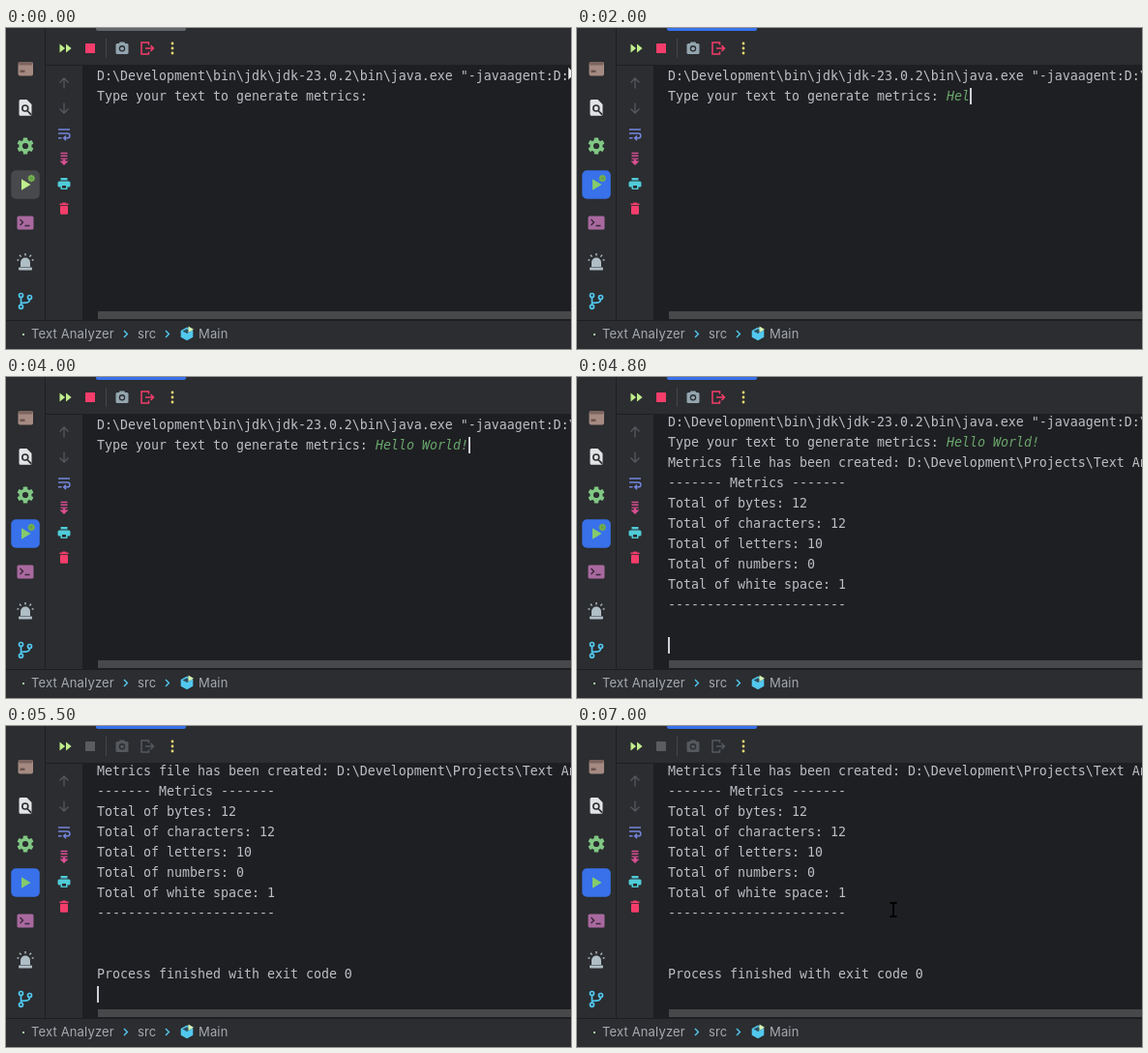
An HTML page with a canvas for the animation above (7.1 s loop, 584 by 332 pixels).

```html
<!DOCTYPE html>
<html lang="en">
<head>
<meta charset="utf-8">
<title>Console run</title>
<style>
html, body { margin: 0; width: 584px; height: 332px; overflow: hidden; background: #2b2d30; }
canvas { display: block; }
</style>
</head>
<body>
<canvas id="stage" width="584" height="332"></canvas>
<script>
const ctx = document.getElementById('stage').getContext('2d');
const LOOP = 7100;
const PANEL = '#2b2d30', CONSOLE = '#1e1f22', TEXT = '#bcbec4', DIM = '#55585d';
const RED = '#f43d6b', LIME = '#c0ee8c', CYAN = '#52c8ee', BLUE = '#3871ea';
const MONO = '13.29px "DejaVu Sans Mono", "Noto Sans Mono", monospace';
const UI = '13px Inter, Roboto, sans-serif';

const T = { focus: 300, type: 1500, key: 200, enter: 4500, exit: 5300, mouse: 6300 };
const PROMPT = 'Type your text to generate metrics: ';
const INPUT = 'Hello World!';
const OUTPUT = [
  'Metrics file has been created: D:\\Development\\Projects\\Text Analyzer',
  '------- Metrics -------',
  'Total of bytes: 12',
  'Total of characters: 12',
  'Total of letters: 10',
  'Total of numbers: 0',
  'Total of white space: 1',
  '-----------------------'
];
const CELL = 8, LEFT = 94, LEAD = 21;

function rect(x, y, w, h, color, r = 0) {
  ctx.fillStyle = color;
  ctx.beginPath();
  ctx.roundRect(x, y, w, h, r);
  ctx.fill();
}
function fill(d, color) {
  ctx.fillStyle = color;
  ctx.fill(new Path2D(d), 'evenodd');
}
function stroke(d, color, w = 1.4) {
  ctx.strokeStyle = color;
  ctx.lineWidth = w;
  ctx.stroke(new Path2D(d));
}
function disc(x, y, r, color) {
  ctx.fillStyle = color;
  ctx.beginPath();
  ctx.arc(x, y, r, 0, 7);
  ctx.fill();
}
function ring(x, y, r, color, w) {
  ctx.strokeStyle = color;
  ctx.lineWidth = w;
  ctx.beginPath();
  ctx.arc(x, y, r, 0, 7);
  ctx.stroke();
}
function text(s, x, y, color, font) {
  ctx.font = font;
  ctx.fillStyle = color;
  ctx.fillText(s, x, y);
}
function gear(x, y, r, n, color, hole) {
  for (let i = 0; i < n; i++) {
    ctx.save();
    ctx.translate(x, y);
    ctx.rotate(i * 2 * Math.PI / n);
    rect(-r * .26, -r, r * .52, r, color, r * .1);
    ctx.restore();
  }
  disc(x, y, r * .76, color);
  disc(x, y, r * .36, hole);
}

function sideBar(focused, running) {
  // project
  rect(12.5, 35, 15.5, 14.5, '#a58a82', 2);
  rect(13, 35, 14.5, 3.5, '#7d655f', 1.5);
  rect(14.5, 43.5, 5, 2.5, '#6a544e');
  // find
  fill('M15 74h6.5l5 5v10.2a1.5 1.5 0 0 1-1.5 1.5h-10a1.5 1.5 0 0 1-1.5-1.5v-13.7a1.5 1.5 0 0 1 1.5-1.5z', '#e2e3e4');
  ring(19.8, 83, 3, PANEL, 1.6);
  stroke('M22 85.5l4 4.2', PANEL, 1.7);
  // settings
  gear(20, 122, 8.6, 6, '#81c784', PANEL);
  // run
  rect(5.3, 147.3, 29.5, 29.5, focused ? BLUE : '#47494d', 5);
  fill('M16 156.2l9.5 5.8l-9.5 5.8z', focused ? '#85cb6c' : LIME);
  if (running) {
    gear(26.3, 155.5, 3.7, 8, '#74b04f', '#5f9a48');
  }
  // terminal
  rect(11.5, 194.5, 17, 14, '#a9699f', 1.5);
  stroke('M14.5 198l3 3l-3 3M19.5 204.5h5', '#3a2638', 1.4);
  // alarm
  fill('M15 247v-4.5a5 5 0 0 1 10 0v4.5z', '#b0bec5');
  rect(13, 247.5, 14, 3, '#b0bec5', .8);
  stroke('M20 233v2.5M14 234.8l1.6 1.8M26 234.8l-1.6 1.8M11.5 240h1.8M26.7 240h1.8', '#b0bec5', 1.4);
  // branch
  ring(15.5, 276.5, 2, CYAN, 1.7);
  ring(24.5, 278.5, 2, CYAN, 1.7);
  ring(15.5, 288.3, 2, CYAN, 1.7);
  stroke('M15.5 278.5v8M24.5 280.5c0 4-3 3.8-9 4', CYAN, 1.7);
}

function toolBar(running) {
  const cam = running ? '#93a5af' : DIM;
  fill('M55.5 16.5l5.6 4.5l-5.6 4.5zM62 16.5l5.6 4.5l-5.6 4.5z', LIME);
  rect(82, 16, 10, 10, running ? RED : '#5a5c60', .5);
  rect(103, 11, 1, 20, '#45474b');
  rect(113.5, 16, 13, 11, cam, 1.5);
  rect(117, 14.5, 6, 4, cam, 1);
  disc(120, 21.3, 3.2, PANEL);
  disc(120, 21.3, 1.9, cam);
  const out = running ? RED : DIM;
  stroke('M147.5 17.5v-2.5h-7.5v12h7.5v-2.5M144 21h8.2M149.5 18l3 3l-3 3', out, 1.5);
  for (const y of [16, 21, 26]) disc(172, y, 1.4, '#f4dc72');
}

function actionBar() {
  stroke('M60 62.5v-10.5M55.5 56.5l4.5-4.5l4.5 4.5', DIM, 1.3);
  stroke('M60 77.5v10.5M55.5 83.5l4.5 4.5l4.5-4.5', DIM, 1.3);
  stroke('M54 105h12M54 109h9.5a2.4 2.4 0 0 1 0 4.8h-3M54 113.8h3.5M62 111.5l-2.3 2.3l2.3 2.3', '#7485dc', 1.5);
  stroke('M56.5 129.5h7M56.5 132.3h7M56.5 135.1h7', '#d84f92', 1.4);
  fill('M58.8 136h2.4v1.5h3.3l-4.5 4.5l-4.5-4.5h3.3z', '#d84f92');
  const teal = '#50cbd8';
  rect(56.5, 155, 7, 2.5, teal);
  rect(53.5, 158.5, 13, 6, teal, 1.5);
  rect(56.5, 162, 7, 5, teal);
  rect(58, 163, 4, 2.7, PANEL);
  rect(55.5, 181.5, 9, 1.7, RED);
  rect(58, 180.6, 4, 1.5, RED);
  rect(56, 184, 8, 8.8, RED, 1);
}

function breadcrumbs() {
  const c = '#a6a9af';
  rect(17, 316, 2, 2, '#a6dba0');
  ctx.letterSpacing = '0.15px';
  text('Text Analyzer', 26, 321, c, UI);
  text('src', 136, 321, c, UI);
  text('Main', 199, 321, c, UI);
  ctx.letterSpacing = '0px';
  for (const x of [122, 165]) stroke(`M${x} 313l3.4 3.5l-3.4 3.5`, CYAN, 1.4);
  fill('M187 309.5l6.3 3.5v6.8l-6.3 3.5l-6.3-3.5v-6.8z', CYAN);
  fill('M182.5 313.5l4.5-2.3l4.5 2.3l-4.5 2.4z', '#2c5263');
  fill('M188.5 308.5l5.5 3.2l-5.5 3.3z', '#d5f2b4');
}

function consoleView(t) {
  const done = t >= T.enter, ended = t >= T.exit;
  const typed = Math.max(0, Math.min(INPUT.length, Math.floor((t - T.type) / T.key) + 1));
  const base = ended ? 51 - 2 * LEAD : done ? 51 : 54;
  const row = (s, i, col = 0, color = TEXT, style = '') =>
    text(s, LEFT + col * CELL, base + i * LEAD, color, style + MONO);

  ctx.save();
  ctx.beginPath();
  ctx.rect(80, 39, 504, 254);
  ctx.clip();
  row('D:\\Development\\bin\\jdk\\jdk-23.0.2\\bin\\java.exe "-javaagent:D:\\', 0);
  row(PROMPT, 1);
  row(INPUT.slice(0, typed), 1, PROMPT.length, '#6aa66c', 'italic ');
  if (done) OUTPUT.forEach((s, i) => row(s, i + 2));
  if (ended) row('Process finished with exit code 0', 12);

  let since = t - T.focus, line = 1, col = PROMPT.length + typed;
  if (typed) since = t - T.type - (typed - 1) * T.key;
  if (done) { since = t - T.enter; line = 11; col = 0; }
  if (ended) { since = t - T.exit; line = 13; }
  if (since >= 0 && since % 1000 < 500)
    rect(LEFT + col * CELL, base + line * LEAD - 13, 2, 17, '#ced0d6');
  ctx.restore();
  rect(95, 293, 489, 8, '#474849');
}

function pointer(t) {
  if (t < T.focus) {
    const x = 581 + t / 100, y = 40;
    const d = `M${x} ${y}v14l3.3-3l2.2 5l2-1l-2.2-4.8h4.4z`;
    fill(d, '#f4f4f4');
    stroke(d, '#111', .6);
  }
  if (t >= T.mouse) {
    const k = Math.min(1, (t - T.mouse) / 600), e = 1 - (1 - k) ** 3;
    const x = 590 - 263 * e, y = 130 + 60 * e;
    stroke(`M${x - 3.5} ${y - 7}h7M${x} ${y - 7}v14M${x - 3.5} ${y + 7}h7`, '#000', 1.8);
  }
}

function draw(t) {
  const focused = t >= T.focus, running = t < T.exit;
  rect(0, 0, 584, 332, PANEL);
  rect(79, 39, 505, 263, CONSOLE);
  rect(40, 0, 1, 302, CONSOLE);
  rect(41, 38, 543, 1, CONSOLE);
  rect(0, 302, 584, 1, CONSOLE);
  rect(93, 0, 93, 3, focused ? BLUE : '#63666b', [0, 0, 2, 2]);
  sideBar(focused, running);
  toolBar(running);
  actionBar();
  consoleView(t);
  breadcrumbs();
  pointer(t);
}

const start = performance.now();
function tick() {
  const t = (performance.now() - start) % LOOP;
  draw(Math.floor(t / 100) * 100);
  requestAnimationFrame(tick);
}
tick();
</script>
</body>
</html>
```
